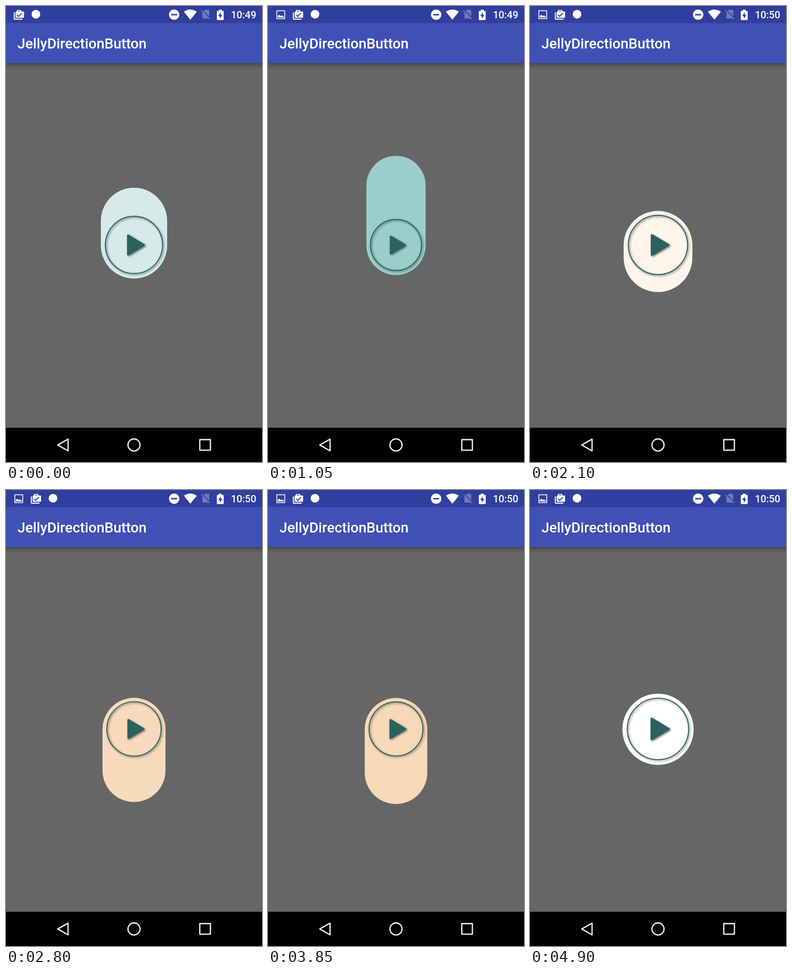
An HTML page with a canvas for the animation above (5250 ms loop, 561 by 998 pixels).

```html
<!DOCTYPE html>
<html lang="en">
<head>
<meta charset="utf-8">
<title>JellyDirectionButton</title>
<style>
html, body { margin: 0; width: 100%; height: 100%; overflow: hidden; background: #666; }
canvas { display: block; }
</style>
</head>
<body>
<canvas id="stage" width="561" height="998"></canvas>
<script>
const ctx = document.getElementById('stage').getContext('2d');
const W = 561, H = 998, CX = 280.5, STEP = 350;
const STATUS = '#303f9f', TEAL = '#2b625d';

// Drag distance per step: negative is up, positive is down.
const drag = [-53.5, -100, -129, -131, -133.5, -60, 27, 60, 90, 108, 105.5, 95, 77, 30, 0];

function rect(color, x, y, w, h) {
  ctx.fillStyle = color;
  ctx.fillRect(x, y, w, h);
}

function disc(color, x, y, r) {
  ctx.fillStyle = color;
  ctx.beginPath();
  ctx.arc(x, y, r, 0, Math.PI * 2);
  ctx.fill();
}

function icon(x, y, d, color = '#fff') {
  ctx.save();
  ctx.translate(x, y);
  ctx.fillStyle = color;
  ctx.fill(new Path2D(d), 'evenodd');
  ctx.restore();
}

function text(str, x, y, size, align) {
  ctx.font = `500 ${size}px Roboto, sans-serif`;
  ctx.textAlign = align;
  ctx.fillStyle = '#fff';
  ctx.fillText(str, x, y);
}

function picture(x) {
  icon(x, 19, 'M-9.5-9.5h19v19h-19zM-7.7-7.7v15.4h15.4v-15.4zM-6.5 6V3l3.5-3 3 3 2.5-1.5 4 3V6z');
}

function briefcase(x) {
  icon(x, 19, 'M-11-5h2.2V8.7H8V11h-17q-2 0-2-2z' +
    'M-4.5-7v-1.5q0-1.8 1.8-1.8h6.4q1.8 0 1.8 1.8V-7h4.3q1.7 0 1.7 1.7V5q0 1.7-1.7 1.7h-15Q-7 6.7-7 5V-5.3Q-7-7-5.3-7z' +
    'M-2.3-7h5.6v-1.2h-5.6zM-3.2-.2-4.7 1.3-.4 5.2 7.3-2.6 5.8-4.1-.4 2.2z');
}

function statusBar(step) {
  rect(STATUS, 0, 0, W, 37.5);
  let x = 28;
  if (step > 0) {
    picture(x);
    x += 37.5;
  }
  briefcase(x);
  disc('#fff', x + 37.5, 18, 9.5);

  disc('#fff', 368.5, 19, 11.3);
  rect(STATUS, 362, 17.4, 13, 3.2);
  icon(404, 30, 'M0 0-14.2-17.5Q0-27 14.2-17.5z');
  icon(425, 5, 'M10.7 3.2h7.5q2.1 0 2.1 2.1v12.5L8.2 5.7z' +
    'M3.9 4.1 22.6 22.8l-1.4 1.4-2-2q-.5.3-1 .3H7.5q-2.1 0-2.1-2.1v-12L2.5 5.5z', 'rgba(255,255,255,.3)');
  icon(469.5, 8, 'M-3.2 0h6.4v2.7h2.9q1.4 0 1.4 1.4v17.2q0 1.4-1.4 1.4H-6.1q-1.4 0-1.4-1.4V4.1q0-1.4 1.4-1.4h2.9z' +
    'M1-19zM1.2 5.8-4.5 13.8H-1V20L4.7 11.6H1.2z');
  text(step < 4 ? '10:49' : '10:50', 548.5, 27, 21.9, 'right');
}

function toolbar() {
  const shade = ctx.createLinearGradient(0, 125, 0, 140);
  shade.addColorStop(0, 'rgba(0,0,0,.32)');
  shade.addColorStop(.4, 'rgba(0,0,0,.11)');
  shade.addColorStop(1, 'rgba(0,0,0,0)');
  rect(shade, 0, 125, W, 15);
  rect('#3f51b5', 0, 37.5, W, 87.5);
  text('JellyDirectionButton', 25, 93, 31.2, 'left');
}

function navBar() {
  rect('#000', 0, 923, W, H - 923);
  ctx.strokeStyle = '#eee';
  ctx.lineWidth = 2.8;
  ctx.lineJoin = 'round';
  ctx.stroke(new Path2D('M113.5 960.8 136 948v25.6z'));
  ctx.beginPath();
  ctx.arc(CX, 960.7, 13.2, 0, Math.PI * 2);
  ctx.stroke();
  ctx.strokeRect(424.7, 949, 23.2, 23.2);
}

function button(d) {
  const len = Math.abs(d), r = 78 - len * .1;
  const fade = d < 0 ? [.77, .385, .4] : [.085, .41, .76];
  const [red, green, blue] = fade.map(k => Math.round(255 - k * len));
  ctx.fillStyle = `rgb(${red},${green},${blue})`;
  ctx.beginPath();
  ctx.roundRect(CX - r, 523.8 + Math.min(d, 0) - r, r * 2, r * 2 + len, r);
  ctx.fill();

  ctx.save();
  ctx.translate(CX, 523);
  ctx.shadowColor = 'rgba(0,0,0,.55)';
  ctx.shadowBlur = 4;
  ctx.shadowOffsetX = ctx.shadowOffsetY = 2;
  ctx.strokeStyle = ctx.fillStyle = TEAL;
  ctx.lineWidth = 2.2;
  ctx.beginPath();
  ctx.arc(0, 0, r * .862, 0, Math.PI * 2);
  ctx.stroke();

  // Triangle with rounded corners, filled as one shape so its shadow stays even.
  const a = [-.21 * r, -.34 * r], b = [.36 * r, 0], c = [-.21 * r, .34 * r];
  ctx.beginPath();
  ctx.moveTo(a[0], 0);
  ctx.arcTo(...a, ...b, r * .03);
  ctx.arcTo(...b, ...c, r * .03);
  ctx.arcTo(...c, ...a, r * .03);
  ctx.closePath();
  ctx.fill();
  ctx.restore();
}

function draw(now) {
  const step = Math.floor(now / STEP) % drag.length;
  rect('#666', 0, 0, W, H);
  toolbar();
  statusBar(step);
  button(drag[step]);
  navBar();
}

let start;
function tick(now) {
  start ??= now;
  draw(now - start);
  requestAnimationFrame(tick);
}
draw(0);
requestAnimationFrame(tick);
</script>
</body>
</html>
```
